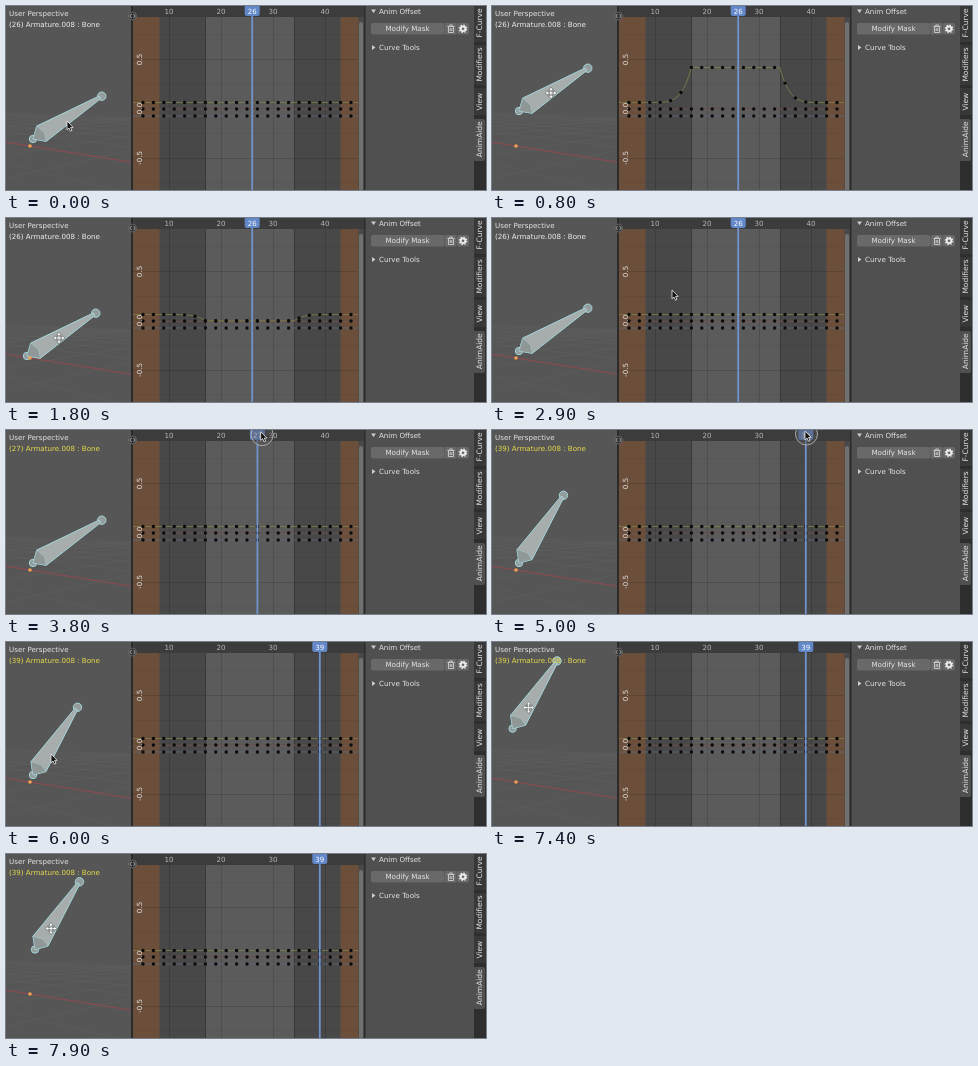
Recreate the animation shown at these times as an HTML page. Size 480 by 184 pixels, loop 8000 ms.

```html
<!DOCTYPE html>
<html lang="en">
<head>
<meta charset="utf-8">
<title>Animation offset mask</title>
<style>
html, body { margin: 0; width: 100%; height: 100%; overflow: hidden; background: #2b2b2b; }
svg { display: block; width: 480px; height: 184px; font: 7.1px "DejaVu Sans", sans-serif; }
text { fill: #e4e4e4; }
.mid { text-anchor: middle; }
.tick { fill: #b4b4b4; }
</style>
</head>
<body>
<svg viewBox="0 0 480 184">
  <defs>
    <clipPath id="viewClip"><rect width="125" height="184"/></clipPath>
    <clipPath id="graphClip"><rect x="127" y="11" width="225" height="173"/></clipPath>
  </defs>

  <g clip-path="url(#viewClip)">
    <rect width="125" height="184" fill="#565656"/>
    <path id="floor" stroke="#fff" stroke-opacity=".05" stroke-width=".6"/>
    <path d="M0 136.200L125 156.200" stroke="#91484e"/>
    <g id="bone" stroke="#a2d6db" stroke-width="1" stroke-linejoin="round">
      <circle id="head" r="3.700" fill="#949c9c"/>
      <circle id="tail" r="4.200" fill="#949c9c"/>
      <path id="body" fill="#a6adac"/>
      <path id="shade" fill="#8f9897" stroke-width=".4"/>
    </g>
    <circle cx="24" cy="140" r="1.800" fill="#f0a050"/>
    <text x="3" y="10">User Perspective</text>
    <text x="3" y="21" id="info"></text>
  </g>

  <rect x="127" width="231" height="184" fill="#484848"/>
  <rect x="200" y="11" width="88" height="173" fill="#5b5b5b"/>
  <path d="M127 11H153.500V184H127zM334.500 11H352.500V184H334.500z" fill="#6c4f3b"/>
  <path d="M127 53.500H352M127 102.500H352M127 152.500H352M163.500 11V184M215.500 11V184M267.500 11V184M319.500 11V184" stroke="#000" stroke-opacity=".14"/>
  <path d="M127 28.500H352M127 78.500H352M127 127.500H352M127 176.500H352" stroke="#000" stroke-opacity=".06"/>
  <path d="M199.500 11V184M288.500 11V184" stroke="#383838"/>
  <g id="rows" clip-path="url(#graphClip)"></g>
  <rect x="127" width="231" height="11" fill="#3c3c3c"/>
  <rect x="353" y="16" width="4" height="172" rx="2" fill="#707070"/>
  <g id="ticks"></g>
  <g class="mid">
    <text transform="translate(136 53.500) rotate(-90)">0.5</text>
    <text transform="translate(136 102.500) rotate(-90)">0.0</text>
    <text transform="translate(136 152) rotate(-90)">-0.5</text>
  </g>
  <circle cx="126.500" cy="10" r="4" fill="#333" stroke="#777" stroke-width=".7"/>
  <path d="M125.500 8L123.700 10L125.500 12M127.500 8L129.300 10L127.500 12" fill="none" stroke="#ccc" stroke-width=".8"/>
  <g id="playhead">
    <path d="M0 9V184" stroke="#7193cd" stroke-width="1.800"/>
    <rect x="-7.500" y="-1" width="15" height="11" rx="2.500" fill="#6288c9"/>
    <text class="mid" y="7.500" id="frameNo" style="fill:#fff"></text>
  </g>

  <rect x="359.500" width="108.500" height="184" fill="#505050"/>
  <path d="M365 3.500H370L367.500 7zM366 39L369.500 41.500L366 44z" fill="#ccc"/>
  <text x="373" y="7.600">Anim Offset</text>
  <text x="373" y="43.800">Curve Tools</text>
  <g fill="#696969"><rect x="365" y="17" width="73.500" height="11.500" rx="2"/><rect x="439" y="17" width="11.500" height="11.500"/><rect x="451" y="17" width="12" height="11.500" rx="2"/></g>
  <text class="mid" x="401.500" y="25.200">Modify Mask</text>
  <path d="M441.500 20.500H448.500M443.700 20.500V19H446.300V20.500M442.500 21V26.500H447.500V21M444.200 22V25M445.800 22V25" fill="none" stroke="#ddd" stroke-width=".8"/>
  <circle cx="457" cy="22.800" r="2.300" fill="none" stroke="#eee" stroke-width="1.800"/>
  <circle cx="457" cy="22.800" r="3.700" fill="none" stroke="#eee" stroke-width="1.200" stroke-dasharray="1.450"/>
  <rect x="468" width="12" height="184" fill="#2e2e2e"/>
  <path d="M468 0H480V36H468zM468 39H480V79H468zM468 82H480V109H468z" fill="#383838"/>
  <rect x="467" y="113" width="12" height="42" rx="2" fill="#505050"/>
  <g class="mid" font-size="7.500">
    <text transform="translate(476.300 17) rotate(-90)">F-Curve</text>
    <text transform="translate(476.300 58.500) rotate(-90)">Modifiers</text>
    <text transform="translate(476.300 95.700) rotate(-90)">View</text>
    <text transform="translate(476.300 133.200) rotate(-90)">AnimAide</text>
  </g>

  <g id="pointer">
    <circle id="ring" cx="1.500" cy="3" r="11" fill="#555" fill-opacity=".45" stroke="#aaa" stroke-width="1"/>
    <path id="arrow" d="M0 0V8.800L2 7L3.400 10.200L5 9.500L3.600 6.400H6.200z" fill="#111" stroke="#eee" stroke-width=".8"/>
    <path id="cross" d="M0 -6L2.200 -3H.8V-.8H3V-2.200L6 0L3 2.200V.8H.8V3H2.200L0 6L-2.200 3H-.8V.8H-3V2.200L-6 0L-3 -2.200V-.8H-.8V-3H-2.200z" fill="#fff" stroke="#444" stroke-width=".5"/>
  </g>
</svg>
<script>
const $ = id => document.getElementById(id);
const set = (el, attrs) => { for (const k in attrs) el.setAttribute(k, attrs[k]); return el; };
const add = (parent, tag, attrs) =>
  parent.appendChild(set(document.createElementNS('http://www.w3.org/2000/svg', tag), attrs));
const show = (id, on) => set($(id), { visibility: on ? 'visible' : 'hidden' });
const clamp = v => Math.max(0, Math.min(1, v));
const frameX = f => 163 + (f - 10) * 5.2;

// Keys are [time, x, y]; the position is linear in between.
function track(keys, t) {
  const n = keys.findIndex(k => k[0] > t);
  if (n <= 0) return keys[n ? keys.length - 1 : 0].slice(1);
  const a = keys[n - 1], b = keys[n], k = (t - a[0]) / (b[0] - a[0]);
  return [1, 2].map(i => a[i] + (b[i] - a[i]) * k);
}

const drag = [[100, 0, 0], [500, -2, -8], [800, 0, -28], [900, 0, -68], [1000, -4, -45],
  [1200, -17, 18], [1300, -6, 5], [1800, -6, 5], [2200, 0, -68], [2300, 0, -68], [2500, 0, 0],
  [7000, 0, 0], [7500, -8, -58], [7900, 2, -37.5]];
const mouse = [[2600, 61, 115], [2700, 90, 106], [2900, 180, 72], [3300, 281, 4], [3500, 248, 2],
  [4400, 268, 1], [4500, 282, 1], [4900, 313, 1], [5300, 313, 1], [5600, 250, 30], [5800, 110, 92],
  [6000, 45, 112]];

// Full strength inside the mask, quintic falloff over nine frames outside.
const mask = f => clamp(1 - Math.max(17 - f, f - 34, 0) / 9) ** 5;

let floor = '';
for (let i = -2; i < 9; i++) floor += `M-245 97L${299 + i * 190} 184M330 97L${-560 + i * 170} 184`;
set($('floor'), { d: floor });

const ticks = [10, 20, 30, 40].map(f => {
  const el = add($('ticks'), 'text', { x: frameX(f), y: 7.5, class: 'mid tick' });
  el.textContent = f;
  return { x: frameX(f), el };
});

const rows = [[110, '#5f6b7c'], [103, '#7c5b55'], [96.5, '#85804a']].map(([y, stroke]) => {
  const line = add($('rows'), 'path', { fill: 'none', stroke, 'stroke-width': .8 });
  const dots = [];
  for (let f = 5; f <= 47; f += 2) dots.push([f, add($('rows'), 'circle', { cx: frameX(f), r: 1.7, fill: '#0b0b0b' })]);
  return { y, line, dots };
});

function drawRow({ y, line, dots }, shift) {
  const at = f => y + shift * mask(f);
  let d = '';
  for (let f = 3; f <= 48; f += .5) d += (d ? 'L' : 'M') + frameX(f) + ' ' + at(f);
  set(line, { d });
  for (const [f, dot] of dots) set(dot, { cy: at(f) });
}

function drawBone(frame, dx, dy) {
  const k = clamp((frame - 30) / 9);
  const angle = (31.9 + 24.8 * k * k * (3 - 2 * k)) * Math.PI / 180;
  const c = Math.cos(angle), s = Math.sin(angle);
  const point = (along, side) => [27 + along * c - side * s, 133 - along * s - side * c];
  const [tx, ty] = point(81, 0);
  set($('bone'), { transform: `translate(${dx} ${dy})` });
  set($('head'), { cx: 27, cy: 133 });
  set($('tail'), { cx: tx, cy: ty });
  set($('body'), { d: `M${point(0, 0)}L${point(10, 9)}L${point(79, 1.5)}L${point(79, -1.5)}L${point(10, -9)}z` });
  set($('shade'), { d: `M${point(0, 0)}L${point(10, 9)}L${point(13, -1)}L${point(10, -9)}z` });
}

function draw(t) {
  const [dx, dy] = track(drag, t);
  const [mx, my] = track(mouse, t);
  // The playhead trails the pointer by one picture.
  const scrubX = track(mouse, Math.min(t - 100, 5200))[0];
  const frame = t < 3600 ? 26 : Math.round(10 + (scrubX - 163) / 5.2);
  const x = frameX(frame);

  drawBone(frame, dx, dy);
  $('info').textContent = `(${frame}) Armature.008 : Bone`;
  $('info').style.fill = frame % 2 ? '#e6d94a' : '#eee';
  rows.forEach((row, i) => drawRow(row, i === 2 && t < 2600 ? dy * 1.25 : 0));

  set($('playhead'), { transform: `translate(${x} 0)` });
  $('frameNo').textContent = frame;
  for (const tick of ticks) set(tick.el, { opacity: Math.abs(tick.x - x) > 14 ? 1 : 0 });

  const dragging = t >= 100 && t < 2500 || t >= 7100;
  set($('pointer'), { transform: `translate(${mx + dx - (dragging ? 2 : 0)} ${my + dy})` });
  show('cross', dragging);
  show('arrow', !dragging);
  show('ring', t >= 3600 && t < 5400);
}

function loop() {
  draw(Math.floor(performance.now() % 8000 / 100) * 100);
  requestAnimationFrame(loop);
}
loop();
</script>
</body>
</html>
```
